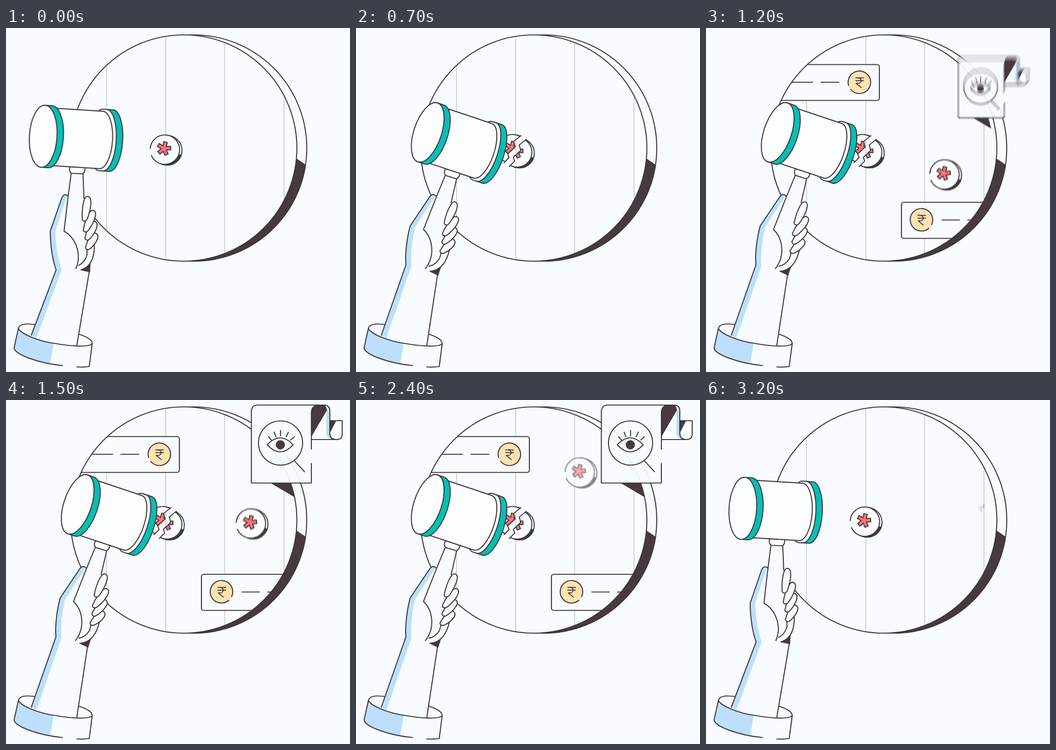
An HTML page with a canvas for the animation above (3300 ms loop, 748x748 px).

```html
<!DOCTYPE html>
<html lang="en">
<head>
<meta charset="utf-8">
<title>Hammer and token</title>
<style>
html, body { margin: 0; width: 100%; height: 100%; overflow: hidden; background: #f8fbff; }
canvas { display: block; width: 748px; height: 748px; }
</style>
</head>
<body>
<canvas id="stage" width="748" height="748"></canvas>
<script>
const SIZE = 748, LOOP = 3300, STEP = 100, SHUTTER = 24, SAMPLES = 12;
const BG = '#f8fbff', INK = '#3e373b', DARK = '#443a40', WHITE = '#fcfdff';
const TEAL = '#04bfb6', BLUE = '#bddffb', RED = '#ff7379', GOLD = '#fde3b0', GREY = '#b9babd';
const TAU = Math.PI * 2;

const out = document.getElementById('stage').getContext('2d');
const layer = (w, h) => {
  const c = document.createElement('canvas');
  c.width = w;
  c.height = h;
  return c.getContext('2d');
};
const scene = layer(SIZE, SIZE);
let g = scene;

const clamp = v => Math.min(1, Math.max(0, v));
const ease = (t, start, length) => (1 - Math.cos(Math.PI * clamp((t - start) / length))) / 2;

// Drawing helpers
function shape(path, fill, stroke = INK, width = 2.2) {
  const p = typeof path === 'string' ? new Path2D(path) : path;
  if (fill) { g.fillStyle = fill; g.fill(p); }
  if (stroke) {
    g.strokeStyle = stroke;
    g.lineWidth = width;
    g.lineJoin = g.lineCap = 'round';
    g.stroke(p);
  }
}
const line = (d, stroke, width) => shape(d, null, stroke, width);
const blot = (d, fill) => shape(d, fill, null);
function arc(x, y, r, from = 0, to = TAU) {
  const p = new Path2D();
  p.arc(x, y, r, from, to);
  return p;
}
function group(draw) {
  g.save();
  draw();
  g.restore();
}

// Disc
const face = arc(386.5, 261, 246);

function discRim() {
  const rim = new Path2D('M386 15H408');
  rim.arc(408, 261, 246, -Math.PI / 2, Math.PI / 2);
  rim.lineTo(386, 507);
  shape(rim, BG);
  group(() => {
    g.clip(new Path2D('M600 262L670 310V520H386V300Z'));
    shape(rim, DARK);
  });
  blot(face, BG);
}

// Cards
function coin(x, y, gapFrom, gapTo) {
  blot(arc(x, y, 24.5), GOLD);
  line(arc(x, y, 24.5, gapTo, gapFrom + TAU));
  group(() => {
    g.translate(x, y);
    line('M-8 -9.5H9M-8 -3.5H9M-8 -9.5H-3C6 -9.5 6 2.5 -3 2.5H-7L4 11.5', INK, 1.9);
  });
}

function cards(t) {
  const away = 1 - ease(t, 690, 500) + ease(t, 2600, 513);
  group(() => {
    g.clip(face);
    group(() => {
      g.translate(-260 * away, 0);
      const box = new Path2D();
      box.roundRect(60, 79.5, 317, 78, 5);
      shape(box, BG);
      line('M180 118H232M250 118H289');
      coin(333.5, 118, 2.45, 2.85);
    });
    group(() => {
      g.translate(212 * away, 0);
      const box = new Path2D();
      box.roundRect(425, 379, 300, 78.5, 5);
      shape(box, BG);
      line('M513 417.5H551M569 417.5H607');
      coin(468.5, 417, 0.45, 0.85);
    });
  });
}

// Token
function star(x, y) {
  for (const [width, len, color] of [[9.6, 15.6, INK], [5.4, 13.5, RED]]) {
    g.lineCap = 'butt';
    g.strokeStyle = color;
    g.lineWidth = width;
    g.beginPath();
    for (let i = 0; i < 5; i++) {
      const a = i * TAU / 5 + 0.24;
      g.moveTo(x, y);
      g.lineTo(x + len * Math.sin(a), y - len * Math.cos(a));
    }
    g.stroke();
  }
}

function token() {
  const side = arc(350.5, 266, 32.2);
  shape(side, WHITE);
  group(() => {
    g.clip(new Path2D('M340 268L390 277V305H300V268Z'));
    shape(side, DARK);
  });
  blot(arc(345.5, 264.5, 32), WHITE);
  line(arc(345.5, 264.5, 32, -3.07, 2.73));
  star(343.5, 262);
}

const CRACK = 'L364 236L349 248L352 260L336 275L339 283L328 294';
function half(dx, dy, start, end) {
  group(() => {
    g.translate(dx, dy);
    const cut = new Path2D(start + CRACK + end);
    g.clip(cut);
    token();
    g.clip(new Path2D('M310 264A34 34 0 0 1 345 231H351A35 35 0 0 1 351 301A36 36 0 0 1 310 264Z'));
    line('M364 236' + CRACK, INK, 4);
  });
}

function struckToken(t) {
  const open = ease(t, 240, 100) - ease(t, 2470, 250);
  if (open < 0.001) return token();
  const fly = Math.sin(Math.PI * clamp((t - 250) / 300));
  half(-5 * open, -1 * open, 'M300 220H376', 'L318 306H300Z');
  half(5 * open + 20 * fly, 6 * open, 'M410 220H376', 'L318 306H410Z');
}

// Floating token: time, x, y
const ROUTE = [
  [900, 152, 92], [1200, 173, 54], [1500, 187, 4],
  [1800, 172.5, -41], [2400, 141, -107], [2700, 124, -136]
];
function along(t, k) {
  const last = ROUTE.length - 1;
  const at = Math.min(last, Math.max(0, t < ROUTE[0][0] ? 0 : ROUTE.filter(p => p[0] <= t).length - 1));
  const i = Math.min(at, last - 1);
  const slope = n => {
    const a = ROUTE[Math.max(0, n - 1)], b = ROUTE[Math.min(last, n + 1)];
    return (b[k] - a[k]) / (b[0] - a[0]);
  };
  const p = ROUTE[i], q = ROUTE[i + 1], d = q[0] - p[0], u = clamp((t - p[0]) / d), v = 1 - u;
  return v * v * (1 + 2 * u) * p[k] + u * u * (3 - 2 * u) * q[k]
    + u * v * d * (v * slope(i) - u * slope(i + 1));
}

const sprite = layer(80, 80);
g = sprite;
g.translate(-308, -226);
token();
g = scene;

function floatingToken(t) {
  const alpha = clamp((t - 900) / 200) * clamp((2650 - t) / 420);
  if (!alpha) return;
  g.globalAlpha = alpha;
  g.drawImage(sprite.canvas, 308 + along(t, 1), 226 + along(t, 2));
  g.globalAlpha = 1;
}

// Paper scroll with the eye
function scroll(t) {
  const s = ease(t, 905, 435) - ease(t, 2833, 435);
  if (s < 0.003) return;
  group(() => {
    g.translate(598, 244);
    g.scale(s, s);
    g.translate(-598, -244);
    blot('M576 181L627 211L619 181Z', DARK);
    shape('M704 45H731V74Q731 86 718 86Q704 86 704 74Z', WHITE);
    blot('M704 45H718L704 72Z', DARK);
    shape('M664 86H718Q704 86 704 72V24Q704 11 691 11H680Q664 12 664 28Z', WHITE);
    blot('M697 20Q703 22 703 30V72Q704 82 714 85Q697 85 696 72Z', BLUE);
    blot('M664 80L698 22Q697 12 690 11H680Q664 12 664 28Z', DARK);
    line('M664 86H718Q704 86 704 72V24Q704 11 691 11');
    blot('M533.5 181V25Q534 11 548 11H680Q664 12 664 28V181Z', 'rgba(248,251,255,.93)');
    line('M664 107V28Q664 12 680 11H548Q534 11 533.5 25V180.5H664V138');
    line(arc(597, 93.5, 48));
    line('M627 132L649 156');
    line('M568 97.5Q596 67 624.5 97.5Q596 128 568 97.5Z');
    blot(arc(596.5, 97.5, 10), DARK);
    line('M597 66V78M583 70L587 80M571 80L577 87M614 70L609 80M627 80L619 87');
  });
}

// Arm and hammer
const PIVOT = [151, 519];
function swung(x, y, a) {
  const dx = x - PIVOT[0], dy = y - PIVOT[1], c = Math.cos(a), s = Math.sin(a);
  return (PIVOT[0] + dx * c - dy * s) + ' ' + (PIVOT[1] + dx * s + dy * c);
}

function forearm(a) {
  const left = swung(109, 526, a), inner = swung(121, 526, a), right = swung(181, 530, a);
  line('M27 653C30 641 50 643 64 645M159 666C175 671 189 679 187 686');
  blot(`M${left}L${right}L154 692L55 672Z`, BG);
  blot(`M${left}L${inner}L66 674L55 669Z`, BLUE);
  line(`M${left}L55 668M${right}L154 690`);
}

function cuff() {
  const rim = 'M27 653C32 666 75 682 104 685.5', rest = 'C140 692 182 695 187.5 686';
  blot(rim + rest + 'L181 736C150 740 110 734 96 728C60 722 20 712 17.5 696Z', BG);
  blot(rim + 'L96 729C60 722 20 712 17.5 696Z', BLUE);
  line(rim + rest + 'L181 736Q168 738 154 737M27 653L17.5 696C20 710 70 729 123 734');
}

function drum(x0, x1, rx, ry, fill) {
  const p = new Path2D();
  p.ellipse(x1, 0, rx, ry, 0, -Math.PI / 2, Math.PI / 2);
  p.ellipse(x0, 0, rx, ry, 0, Math.PI / 2, Math.PI * 1.5);
  p.closePath();
  shape(p, fill);
}

function finger(x, y, length, tilt) {
  const p = new Path2D();
  p.moveTo(-6, length - 6);
  p.bezierCurveTo(-9, 4, -10, -length, 0, -length);
  p.bezierCurveTo(12, -length, 10, 2, 5, length - 5);
  p.bezierCurveTo(2, length + 2, -6, length + 2, -6, length - 6);
  group(() => {
    g.translate(x, y);
    g.rotate(tilt);
    shape(p, BG);
  });
}

function hand() {
  const palm = 'C150 455 166 490 152 523', thumb = 'M109 526C101 505 96 470 96 442L121 369Q126 359 134 365';
  blot(thumb + 'L170 380L192 470Q192 506 163 526L152 523Z', BG);
  blot('M109 526C101 505 96 470 96 442L121 369Q126 360 132 365L107 442C108 470 112 500 121 526Z', BLUE);
  line(thumb);
  blot('M163 527Q176 522 184 508L183 531Z', DARK);
  line('M192 468C193 495 186 519 163 526');
  blot('M141 317H167L170 372L176 490L152 523' + 'C166 490 150 455 126 442Z', BG);
  line('M141 317L134 372L126 442' + palm + 'M167 317L169 370M176 481V494Q170 511 158 516');
  finger(186, 464, 20, 0.5);
  finger(184.5, 441, 22, 0.42);
  finger(181, 420, 25, 0.36);
  finger(174, 393, 27, 0.12);
  shape('M138 302Q136 313 142 316L166 317Q172 314 171 303Z', WHITE);
  group(() => {
    g.translate(152, 240);
    g.rotate(0.061);
    drum(62, 76, 25, 67, TEAL);
    drum(54, 62, 25, 67, WHITE);
    drum(-57, 54, 25, 62.5, WHITE);
    drum(-72, -57, 29, 67.5, TEAL);
    drum(-72, -72, 30, 67.5, WHITE);
  });
}

function arm(t) {
  const a = (ease(t, -25, 400) - ease(t, 2420, 360)) * 15 * Math.PI / 180;
  forearm(a);
  cuff();
  group(() => {
    g.translate(...PIVOT);
    g.rotate(a);
    g.translate(-PIVOT[0], -PIVOT[1]);
    hand();
  });
}

function paint(t) {
  g.fillStyle = BG;
  g.fillRect(0, 0, SIZE, SIZE);
  discRim();
  group(() => {
    g.clip(face);
    line('M218.5 0V520M347.5 0V520M475.5 0V520M604.5 0V520', GREY, 1.3);
  });
  cards(t);
  line(face);
  struckToken(t);
  floatingToken(t);
  scroll(t);
  arm(t);
}

// Average several moments for motion blur
function expose(t) {
  for (let i = 0; i < SAMPLES; i++) {
    paint(t + SHUTTER * ((i + 0.5) / SAMPLES - 0.5));
    out.globalAlpha = 1 / (i + 1);
    out.drawImage(scene.canvas, 0, 0);
  }
}

const begin = performance.now();
let shown = -1;
function tick() {
  const now = (performance.now() - begin) % LOOP;
  const step = Math.floor(now / STEP);
  if (step !== shown) expose((shown = step) * STEP);
  requestAnimationFrame(tick);
}
tick();
</script>
</body>
</html>
```
